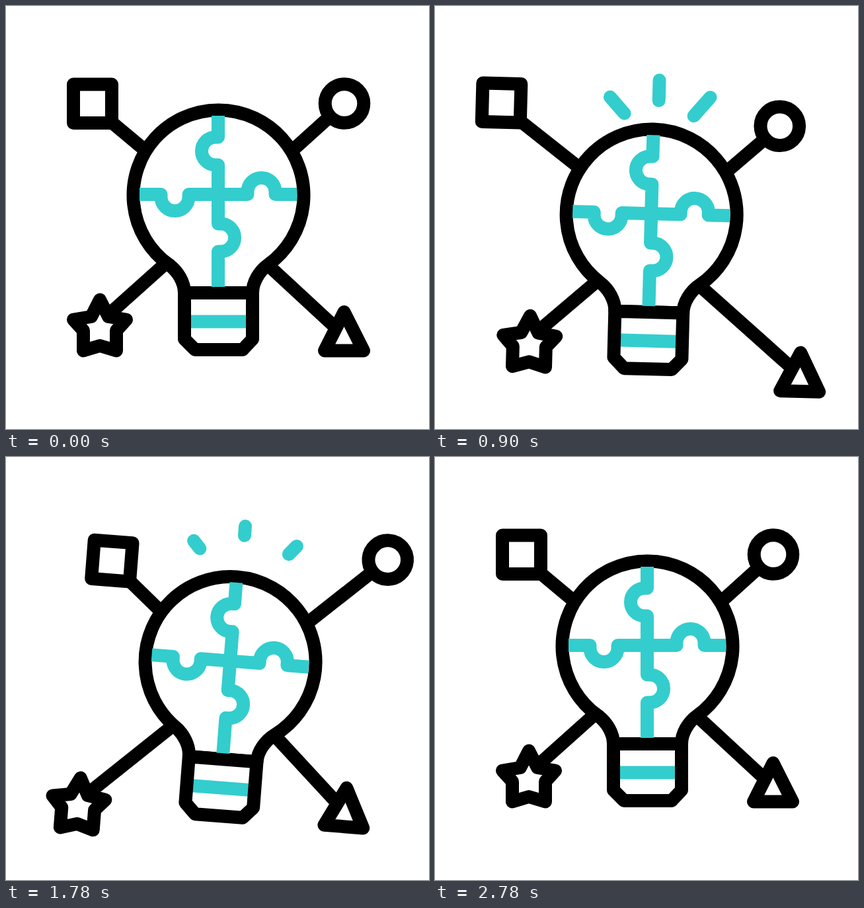
Write an HTML page that moves like this. It is 640 by 640 pixels and loops after 3000 ms.

```html
<!DOCTYPE html>
<html lang="en">
<head>
<meta charset="utf-8">
<title>Idea</title>
<style>
  html, body { margin: 0; width: 100%; height: 100%; overflow: hidden; background: #fff; }
  svg { display: block; width: 100vw; height: 100vh; }
  .ink { fill: #fff; stroke: #000; stroke-width: 20; stroke-linejoin: round; }
  .teal { fill: none; stroke: #33cdcd; stroke-width: 20; stroke-linejoin: round; }
  #rays { stroke-linecap: round; }
</style>
</head>
<body>
<svg viewBox="0 0 640 640">
  <g id="body">
    <g id="rays" class="teal"></g>
    <g id="arms" class="ink"></g>
    <g class="ink">
      <path id="square" d="M102 118.500H160V177H102Z"/>
      <circle id="circle" cx="512" cy="147.500" r="29.300"/>
      <path id="star" d="M142 444.500L155 470L182 474.500L167 491V521.500L142 514L117 521.500V491L102 474.500L129 470Z"/>
      <path id="triangle" d="M511.500 463L541 521.500H482Z"/>
      <path d="M270 434C270 418 260 401 246 391A129 129 0 1 1 397 391C383 401 373 418 373 434Z"/>
    </g>
    <path d="M270 434H373V504L358 520H286L270 504Z" fill="#fff"/>
    <path class="teal" d="M272 477.500H371"/>
    <path class="ink" style="fill:none" d="M270 434H373V504L358 520H286L270 504Z"/>
    <g id="puzzle" class="teal"></g>
  </g>
</svg>
<script>
const LOOP = 3000, STEP = 20;
const $ = id => document.getElementById(id);

function add(parent, tag, attrs) {
  const el = document.createElementNS('http://www.w3.org/2000/svg', tag);
  for (const k in attrs) el.setAttribute(k, attrs[k]);
  return $(parent).appendChild(el);
}

const ease = u => (1 - Math.cos(Math.PI * Math.min(1, Math.max(0, u)))) / 2;

// Eased value at time t from [time, value] keys
function track(keys, t) {
  if (t <= keys[0][0]) return keys[0][1];
  for (let i = 1; i < keys.length; i++) {
    const [t0, v0] = keys[i - 1], [t1, v1] = keys[i];
    if (t < t1) return v0 + (v1 - v0) * ease((t - t0) / (t1 - t0));
  }
  return keys[keys.length - 1][1];
}

const lift = [[220, 0], [520, -41], [840, 32], [1300, -39], [1635, 32], [2040, 0]];
const tilt = [[300, 0], [700, -5.4], [1020, 4.6], [1360, -5.4], [1442, -5.4], [1810, 4.6], [2135, 0]];
const reachA = [[540, 0], [940, 1], [1555, 0]];
const reachB = [[1280, 0], [1680, 1], [1710, 1], [2360, 0]];
const SPIN = [2010, 2780], BURSTS = [682, 1433];

// from: anchor on the bulb, to: end under the shape, out: full travel
const arms = [
  { id: 'square', keys: reachA, from: [215, 222], to: [142, 161], out: [-42, -25] },
  { id: 'triangle', keys: reachA, from: [390, 386], to: [497, 485], out: [42, 27] },
  { id: 'circle', keys: reachB, from: [425, 226], to: [497, 161], out: [36, -34.5] },
  { id: 'star', keys: reachB, from: [250, 382], to: [155, 467], out: [-34, 35.5] }
];
for (const a of arms) a.line = add('arms', 'line', { x1: a.from[0], y1: a.from[1] });

// inner and outer end of each ray
const rays = [[286, 145, 252, 108], [328, 127, 328, 80], [371, 148, 408, 104]]
  .map(pts => ({ pts, line: add('rays', 'line', {}) }));

for (let q = 0; q < 4; q++) {
  add('puzzle', 'path', {
    d: `M0 0V-44.500H-4A21 21 0 0 1 -4 -86.500H0V${q === 2 ? -140 : -119}`,
    transform: `rotate(${q * 90})`
  });
}

function setEnd(line, n, x, y) {
  line.setAttribute('x' + n, x);
  line.setAttribute('y' + n, y);
}

function draw(t) {
  $('body').setAttribute('transform',
    `translate(0 ${track(lift, t)}) rotate(${track(tilt, t)} 321 520)`);

  for (const a of arms) {
    const k = track(a.keys, t), x = a.out[0] * k, y = a.out[1] * k;
    $(a.id).setAttribute('transform', `translate(${x} ${y})`);
    setEnd(a.line, 2, a.to[0] + x, a.to[1] + y);
  }

  const start = BURSTS.find(b => t > b && t < b + 520);
  $('rays').style.display = start === undefined ? 'none' : '';
  if (start !== undefined) {
    const tail = ease((t - start - 50) / 470), head = ease((t - start) / 260);
    for (const { pts: [x1, y1, x2, y2], line } of rays) {
      [tail, head].forEach((k, i) =>
        setEnd(line, i + 1, x1 + (x2 - x1) * k, y1 + (y2 - y1) * k));
    }
  }

  const u = Math.min(1, Math.max(0, (t - SPIN[0]) / (SPIN[1] - SPIN[0])));
  $('puzzle').setAttribute('transform',
    `translate(321 285) rotate(${360 * ease(u ** 0.75)})`);
}

const origin = performance.now();
function tick() {
  const t = (performance.now() - origin) % LOOP;
  draw(Math.floor(t / STEP) * STEP);
  requestAnimationFrame(tick);
}
tick();
</script>
</body>
</html>
```
